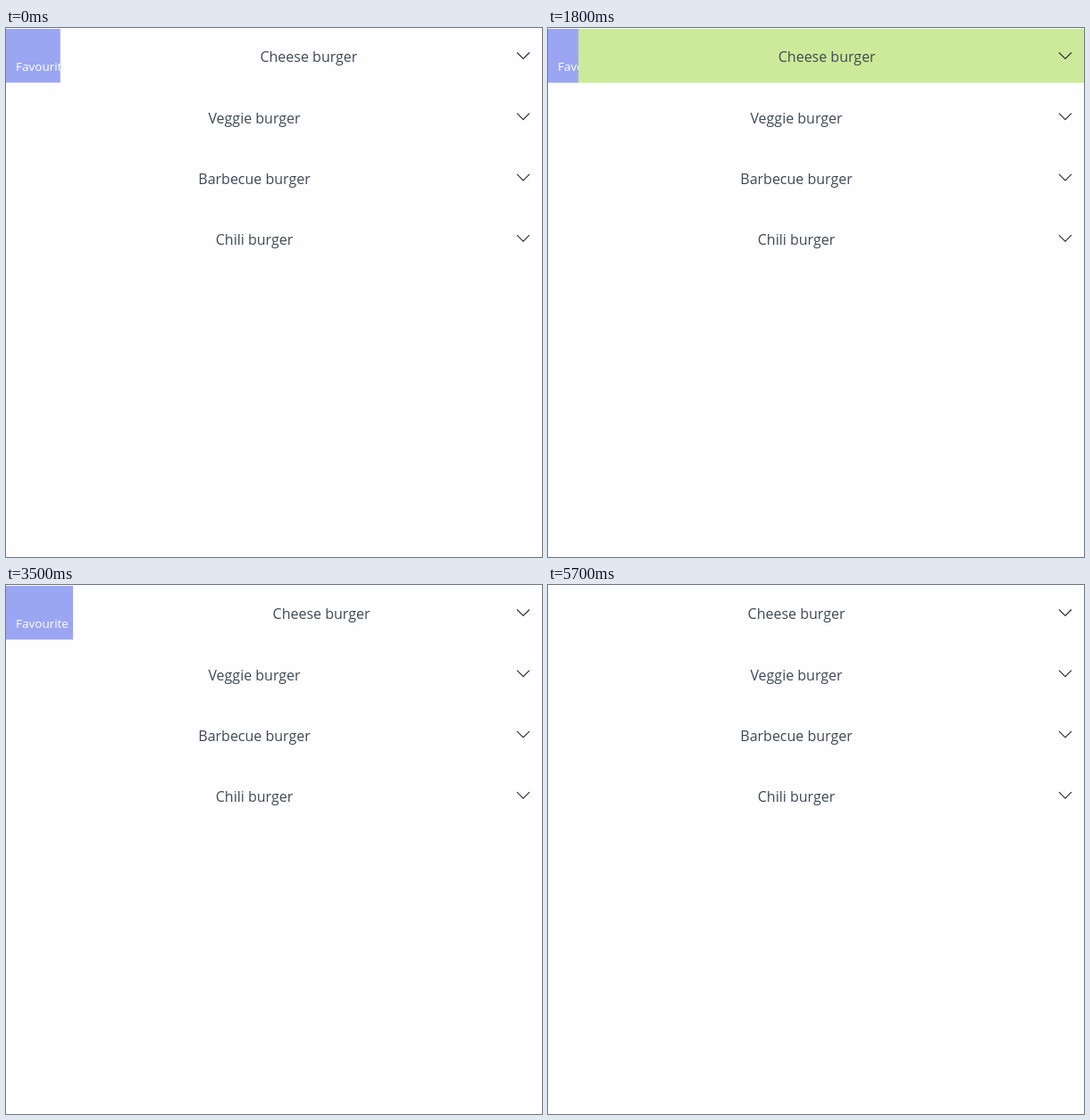
Recreate the animation shown at these times as an HTML page with a canvas. Size 600x593 px, loop 6500 ms.

```html
<!DOCTYPE html>
<html lang="en">
<head>
<meta charset="utf-8">
<title>Burger list</title>
<style>
  html, body { margin: 0; width: 100%; height: 100%; overflow: hidden; background: #fefdff; }
  canvas { display: block; width: 600px; height: 593px; }
</style>
</head>
<body>
<canvas id="stage"></canvas>
<script>
const W = 600, H = 593, LOOP = 6500, STEP = 100;
const ROW = 68.2, BAR = 60.5;
const FONT = '"Open Sans", "Noto Sans", sans-serif';
const ITEMS = ['Cheese burger', 'Veggie burger', 'Barbecue burger', 'Chili burger'];

// Long swipes toggle the favourite once the row is back; short ones only spring back.
const longSwipe = (start, peak, hold) => ({ start, peak, rise: 220, hold, fall: 282, toggles: true });
const shortSwipe = (start, peak) => ({ start, peak, rise: 500, hold: 0, fall: 720 });
const SWIPES = [
  longSwipe(-113, 117, 401), shortSwipe(900, 82),
  longSwipe(2090, 110, 300), shortSwipe(3000, 75)
];

const canvas = document.getElementById('stage');
const ctx = canvas.getContext('2d');
const dpr = window.devicePixelRatio || 1;
canvas.width = W * dpr;
canvas.height = H * dpr;

const progress = (t, start, length) => Math.min(1, Math.max(0, (t - start) / length));
const smooth = p => p * p * (3 - 2 * p);
const cubic = p => p < 0.5 ? 4 * p ** 3 : 1 - 4 * (1 - p) ** 3;

const swipeEnd = s => s.start + s.rise + s.hold + s.fall;

function swipeOffset(s, t) {
  const up = smooth(progress(t, s.start, s.rise));
  const down = smooth(progress(t, swipeEnd(s) - s.fall, s.fall));
  return s.peak * (up - down);
}

function openness(t, ease) {
  return ease(progress(t, 4510, 390)) - ease(progress(t, 5400, 300));
}

function label(text, x, y, size, color, align) {
  ctx.font = `${size}px ${FONT}`;
  ctx.textAlign = align;
  ctx.fillStyle = color;
  ctx.fillText(text, x, y);
}

function chevron(x, y, turn) {
  ctx.save();
  ctx.translate(x, y);
  ctx.rotate(turn);
  ctx.beginPath();
  ctx.moveTo(-7, -3.5);
  ctx.lineTo(0, 3.5);
  ctx.lineTo(7, -3.5);
  ctx.strokeStyle = '#2c3036';
  ctx.lineWidth = 1.15;
  ctx.stroke();
  ctx.restore();
}

function swipeRow(offset, favourite) {
  if (favourite) {
    ctx.fillStyle = '#cdea9a';
    ctx.fillRect(0, 1, W, BAR);
  }
  ctx.save();
  ctx.beginPath();
  ctx.rect(0, 1, offset, BAR);
  ctx.clip();
  ctx.fillStyle = '#9ba6f3';
  ctx.fillRect(0, 1, offset, BAR);
  label('Favourite', 11, 48, 13.5, '#fff', 'left');
  ctx.restore();
}

function draw(t) {
  const offset = SWIPES.reduce((sum, s) => sum + swipeOffset(s, t), 0);
  const toggles = SWIPES.filter(s => s.toggles && t >= swipeEnd(s)).length;
  const gap = ROW * openness(t, cubic);
  const turn = -Math.PI * openness(t, smooth);

  ctx.setTransform(dpr, 0, 0, dpr, 0, 0);
  ctx.fillStyle = '#fefdff';
  ctx.fillRect(0, 0, W, H);
  swipeRow(offset, toggles % 2 === 1);
  ITEMS.forEach((name, i) => {
    const y = i * ROW + (i ? gap : 0);
    label(name, 278 + (i ? 0 : offset), 38.4 + y, 16, '#3f4a55', 'center');
    chevron(579, 31 + y, i ? 0 : turn);
  });
}

const start = performance.now();
function tick() {
  const t = (performance.now() - start) % LOOP;
  draw(Math.floor(t / STEP) * STEP);
  requestAnimationFrame(tick);
}
tick();
</script>
</body>
</html>
```
